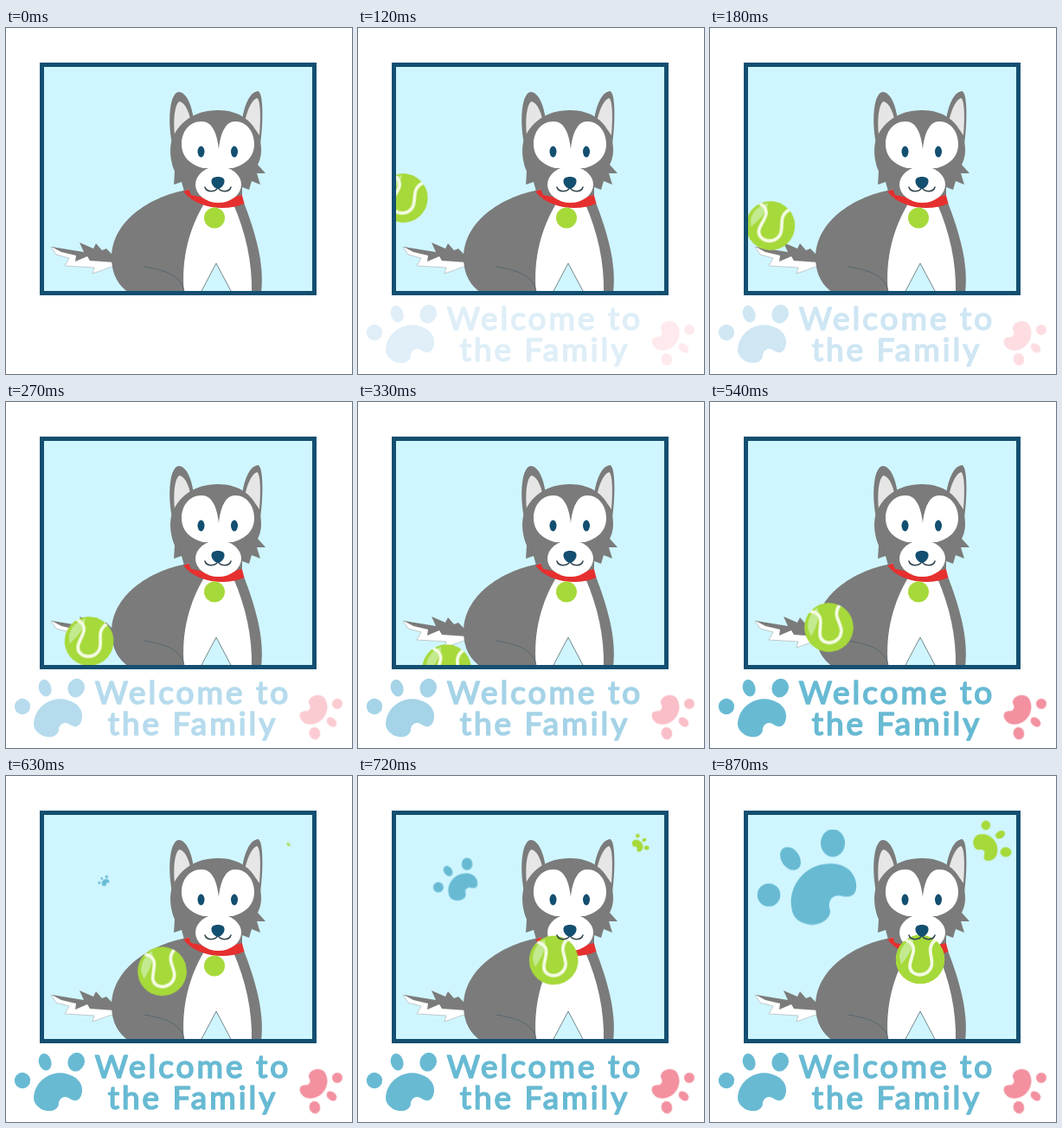
These frames come from a looping animation (400x400 px, 900 ms). An HTML page:

```html
<!DOCTYPE html>
<html lang="en">
<head>
<meta charset="utf-8">
<title>Welcome to the Family</title>
<style>
html, body { margin: 0; width: 100%; height: 100%; overflow: hidden; background: #fff; }
svg { display: block; width: 100vw; height: 100vh; }
.gray { fill: #7b7b7b; }
.white { fill: #fff; }
.navy { fill: #134f70; }
.lime { fill: #a6d93a; }
.blue, .pink, .ball, .spin, .grow { animation: 900ms linear infinite; }
.blue { fill: #68bad3; animation-name: fade-blue; }
.pink { fill: #f391a0; animation-name: fade-pink; }
.ball { animation-name: bounce; }
.spin { animation-name: spin; }
.grow { animation-name: grow; }
text {
  font: 37px Lato, "Open Sans", sans-serif;
  letter-spacing: 3px;
  text-anchor: middle;
  stroke-width: 1.7;
  stroke-linejoin: round;
}
.words { stroke: #68bad3; }

@keyframes fade-blue {
  0% { opacity: 0; fill: #75b5e3; stroke: #75b5e3; }
  60%, 100% { opacity: 1; fill: #68bad3; stroke: #68bad3; }
}
@keyframes fade-pink {
  0% { opacity: 0; fill: #fb9cab; }
  60%, 100% { opacity: 1; fill: #f391a0; }
}
@keyframes bounce {
  0% { transform: translate(5px, 122px); }
  13.33% { transform: translate(52px, 196px); }
  30% { transform: translate(96px, 276px); }
  43.33% { transform: translate(109px, 340px); }
  46.67% { transform: translate(112px, 324px); }
  53.33% { transform: translate(122px, 292px); }
  60% { transform: translate(137px, 261px); }
  65% { transform: translate(157px, 241px); }
  70% { transform: translate(180px, 226px); }
  75% { transform: translate(205px, 217px); }
  80% { transform: translate(226px, 213px); }
  86.67% { transform: translate(238px, 212px); }
  96.67%, 100% { transform: translate(243px, 212px); }
}
@keyframes spin {
  0% { transform: rotate(20deg); }
  30% { transform: rotate(8deg); }
  60% { transform: rotate(-12deg); }
  80% { transform: rotate(-5deg); }
  96.67%, 100% { transform: rotate(0deg); }
}
@keyframes grow {
  0%, 66.67% { transform: scale(0); }
  96.67%, 100% { transform: scale(1); }
}
</style>
</head>
<body>
<svg viewBox="0 0 400 400">
  <defs>
    <clipPath id="room"><rect x="41" y="42" width="316" height="265"/></clipPath>
    <clipPath id="disc"><circle r="28.5"/></clipPath>
    <!-- Paw print, with its origin at the first toe -->
    <g id="paw" stroke="none">
      <circle r="13.3"/>
      <ellipse cx="25" cy="-42" rx="10.5" ry="14.5" transform="rotate(-35 25 -42)"/>
      <ellipse cx="74" cy="-60" rx="14" ry="16"/>
      <path d="M26 13C23-12 43-35 68-36C91-38 103-22 101-7C99 3 91 3 83 1C73-1 67 8 71 18C71 31 55 36 45 34C33 31 27 25 26 13Z"/>
    </g>
  </defs>

  <rect x="41" y="42" width="316" height="265" fill="#cff6ff"/>
  <g clip-path="url(#room)">
    <!-- Tail -->
    <path class="white" stroke="#a5a9ac" stroke-width=".6" d="M52 253L80 260L125 266V275L100 284L102 277L68 275L73 266L58 262Z"/>
    <path class="gray" d="M53 253L90 259L85 248L101 255L104 249L111 257L116 255L126 265V271L97 269L94 264L80 270L81 263L64 259Z"/>

    <!-- Body -->
    <path class="gray" d="M210 187C164 195 122 225 122 265C122 285 130 298 142 306H295C299 272 288 236 275 202Z"/>
    <path class="white" d="M229 203C213 230 202 265 206 306H225L243 272L261 306H284C285 272 277 236 263 204Z"/>
    <path fill="#cff6ff" stroke="#66757c" stroke-width=".8" d="M225 306L243 272L261 306"/>
    <path fill="none" stroke="#4d626d" stroke-width=".8" d="M160 276C178 279 191 283 198 290Q205 296 206 305"/>

    <!-- Collar and tag -->
    <path fill="#e5302f" d="M205 189L214 185C225 202 255 206 272 190L275.500 203C255 212 222 210 205 189Z"/>
    <circle class="lime" cx="241" cy="219.500" r="12"/>

    <!-- Head -->
    <path class="gray" d="M192 134C186 104 190 74 200 74C210 75 215 92 217 106Z"/>
    <path class="gray" d="M294 134C298 104 297 73 291 73C281 74 275 92 273 106Z"/>
    <path fill="#e6e6e6" d="M195 124C193 102 196 86 201 85C208 87 212 99 214 109Q203 113 195 124Z"/>
    <path fill="#e6e6e6" d="M293 124C295 102 294 82 290 81C283 84 278 98 276 109Q286 113 293 124Z"/>
    <path class="gray" d="M191 132C198 109 218 95 245 95C270 95 288 108 294 131C296 142 295 150 291 158L300 168L290 168L294 181L284 177L281 187L273 184L273 193L245 199L214 193L211 186L206 189L203 178L194 181L195 166C190 154 189 142 191 132Z"/>
    <path class="white" d="M246 140C244 121 238 108 226 108C211 108 203 121 203 134C203 149 213 158 228 162H262C277 158 287 149 287 134C287 121 279 108 265 108C254 108 248 121 246 140Z"/>
    <ellipse class="white" cx="245.500" cy="181" rx="26.500" ry="21"/>
    <ellipse class="navy" cx="225.500" cy="143" rx="4" ry="6.500"/>
    <ellipse class="navy" cx="264" cy="143" rx="4" ry="6.500"/>

    <!-- Ball -->
    <g class="ball">
      <g class="spin" clip-path="url(#disc)">
        <circle class="lime" r="28.500"/>
        <path fill="#c3ea8e" d="M-24-3C-23-14-16-22-8-25C-7-14-14-4-22 6Z"/>
        <path fill="none" stroke="#f3fbe2" stroke-width="3.800" stroke-linecap="round" d="M-16-22C0-16-12-2-12 8C-11 21 9 21 13 8C16-2 6-12 17-22"/>
      </g>
    </g>

    <!-- Muzzle -->
    <path fill="none" stroke="#34474f" stroke-width="1.600" stroke-linecap="round" d="M230 184C232 190.500 243 190 245 184C247 190 258 190.500 260 184"/>
    <path class="navy" d="M245 172C250 172 253 174 252.500 178C252 182 248 186 245 186C242 186 238 182 237.500 178C237 174 240 172 245 172Z"/>

    <!-- Paws on the wall -->
    <g transform="translate(113 121.500)"><g class="grow">
      <use href="#paw" x="-45" y="16" fill="#68bad3"/>
    </g></g>
    <g transform="translate(327 79)"><g class="grow">
      <use href="#paw" class="lime" transform="translate(-8 -22) rotate(92.400) scale(.405)"/>
    </g></g>
  </g>
  <rect x="41.500" y="42.500" width="315" height="264" fill="none" stroke="#134f70" stroke-width="5"/>

  <!-- Greeting -->
  <g class="blue words">
    <text x="216" y="349">Welcome to</text>
    <text x="216" y="385">the Family</text>
    <use href="#paw" transform="translate(19 352) rotate(20) scale(.69)"/>
  </g>
  <g class="pink">
    <use href="#paw" transform="translate(383 349) rotate(166.500) scale(.45)"/>
  </g>
</svg>
</body>
</html>
```
